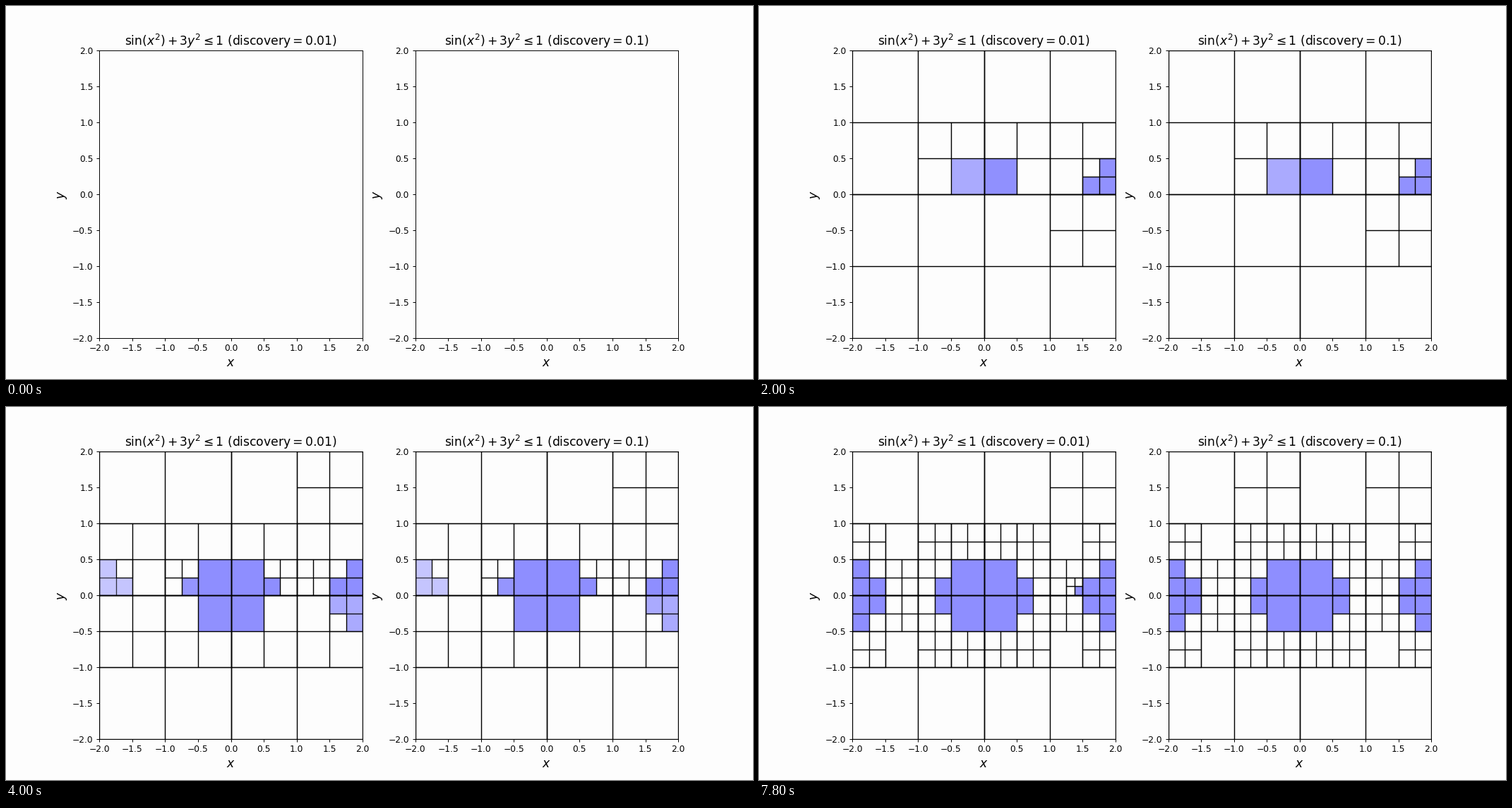
A matplotlib script that plays this animation: 1058x529 px, repeating every 8 s.

```python
import math

import matplotlib.pyplot as plt
from matplotlib.animation import FuncAnimation
from matplotlib.patches import Rectangle

W, H, DPI = 1058, 529, 88
STEPS = 39
PAPER = "#fdfdfd"
BLUE = "#8e8eff"

# Lower-left corner of the cell split at each step.
START = [
    (-2, -2), (0, 0), (1, 0), (-2, 0), (0, 0), (1.5, 0), (0, -2),
    (-2, -2), (-1, 0), (1, -1), (1, 1), (1, 0), (.5, 0),
    (0, -1), (-1, -1), (-2, 0), (-1, 0), (-2, -1), (1.5, -.5), (-2, 0),
    (-1, -.5), (.5, -.5), (-2, -.5), (-.5, .5), (0, .5),
    (-.5, -1), (0, -1), (-1.5, 0), (-1.5, -.5), (1, -.5), (.5, .5), (1.5, .5),
    (-1, .5), (-2, .5),
]
END = [(.5, -1), (1.5, -1), (-1, -1), (-2, -1)]
PANELS = [("0.01", (1.25, 0)), ("0.1", (-1, 1))]


def inside(x, y, size):
    """True when sin(x^2) + 3y^2 <= 1 holds on the whole cell."""
    lo, hi = sorted((x * x, (x + size) ** 2))
    top = 1 if lo <= math.pi / 2 <= hi else max(math.sin(lo), math.sin(hi))
    return top + 3 * max(y * y, (y + size) ** 2) <= 1


def build_cells(splits):
    """Return (x, y, size, birth step) for every cell of the quadtree."""
    leaves = {(-2, -2): 4}
    cells = []
    for step, (x, y) in enumerate(splits, 1):
        half = leaves[x, y] / 2
        for cx in (x, x + half):
            for cy in (y, y + half):
                leaves[cx, cy] = half
                cells.append((cx, cy, half, step))
    return cells


def setup_axes(ax, discovery):
    ax.set_facecolor(PAPER)
    ax.set(xlim=(-2, 2), ylim=(-2, 2))
    ticks = [i / 2 for i in range(-4, 5)]
    ax.set_xticks(ticks)
    ax.set_yticks(ticks)
    ax.set_xlabel("$x$", fontsize=14)
    ax.set_ylabel("$y$", fontsize=14)
    ax.set_title(rf"$\sin(x^2) + 3y^2 \leq 1$ (discovery$\,=\,${discovery})"
                 .replace(r"$\,=\,$", "$ = $"), fontsize=14)


def add_cell(ax, x, y, size, birth):
    edge = Rectangle((x, y), size, size, fill=False, ec="black", lw=1, zorder=2)
    ax.add_patch(edge)
    face = None
    if inside(x, y, size):
        face = Rectangle((x, y), size, size, fc=BLUE, ec="none", lw=0, zorder=1)
        ax.add_patch(face)
    return birth, edge, face


plt.rcParams["font.family"] = "DejaVu Sans"
fig, axes = plt.subplots(1, 2, figsize=((W + .01) / DPI, (H + .01) / DPI),
                         dpi=DPI, facecolor=PAPER)
parts = []
for ax, (discovery, detour) in zip(axes, PANELS):
    setup_axes(ax, discovery)
    for cell in build_cells(START + [detour] + END):
        parts.append(add_cell(ax, *cell))


def update(frame):
    for birth, edge, face in parts:
        age = frame - birth + 1
        edge.set_visible(age > 0)
        if face:
            # Filled cells gain half of the missing opacity at every step.
            alpha = 1 - .5 ** max(age, 0)
            edge.set_alpha(alpha)
            face.set_visible(age > 0)
            face.set_alpha(alpha)
    return []


anim = FuncAnimation(fig, update, frames=STEPS + 1, interval=200,
                     init_func=lambda: update(0), repeat=True, repeat_delay=0)
plt.show()
```
